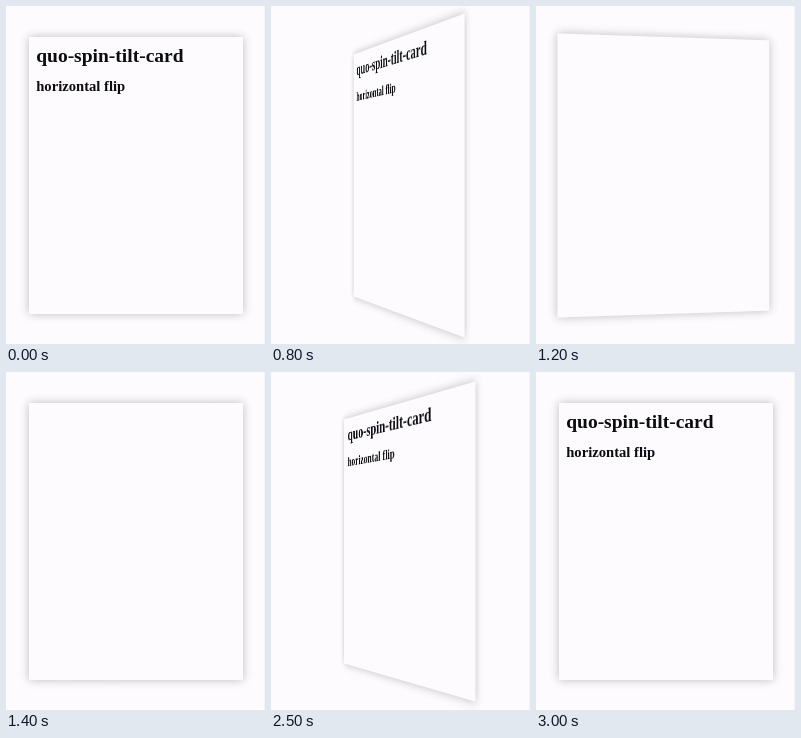
These frames come from a looping animation (259 by 338 pixels, 4500 ms). An HTML page:

```html
<!DOCTYPE html>
<html lang="en">
<head>
<meta charset="utf-8">
<title>Card flip</title>
<style>
  html, body { margin: 0; width: 100%; height: 100%; overflow: hidden; background: #fdfbfe; }
  #stage {
    position: relative; width: 259px; height: 338px; overflow: hidden;
    box-sizing: border-box; border-right: 1px solid #f5f4f6;
  }
  #card {
    position: absolute; left: 22.6px; top: 31px; width: 214px; height: 276.5px;
    background: #fdfbfe; box-shadow: 0 0 9px rgba(0, 0, 0, .25);
    font-family: "Liberation Serif", "Times New Roman", serif; color: #0c0c10;
  }
  h1, h2 { position: absolute; left: 7.2px; margin: 0; line-height: 1.15; white-space: nowrap; }
  h1 { top: 8.2px; font-size: 19.5px; }
  h2 { top: 41px; font-size: 14.63px; }
</style>
</head>
<body>
<div id="stage">
  <div id="card">
    <div id="front">
      <h1>quo-spin-tilt-card</h1>
      <h2>horizontal flip</h2>
    </div>
  </div>
</div>
<script>
const card = document.getElementById('card');
const front = document.getElementById('front');
const LOOP = 4500, STEP = 100, FLIP = 780, OPEN = 632, CLOSE = 2175;

// CSS "ease": cubic-bezier(.25, .1, .25, 1)
function ease(x) {
  if (x <= 0) return 0;
  if (x >= 1) return 1;
  let lo = 0, hi = 1;
  for (let i = 0; i < 24; i++) {
    const s = (lo + hi) / 2;
    if (.75 * s * (1 - s) + s ** 3 < x) lo = s; else hi = s;
  }
  return .3 * lo * (1 - lo) ** 2 + 3 * lo * lo * (1 - lo) + lo ** 3;
}

function draw(now) {
  const t = Math.floor(now % LOOP / STEP) * STEP;
  const angle = 180 * (ease((t - OPEN) / FLIP) - ease((t - CLOSE) / FLIP));
  card.style.transform = `perspective(635px) rotateY(${-angle}deg)`;
  front.style.visibility = angle < 90 ? 'visible' : 'hidden';
}

let start;
function tick(now) {
  start ??= now;
  draw(now - start);
  requestAnimationFrame(tick);
}
draw(0);
requestAnimationFrame(tick);
</script>
</body>
</html>
```
